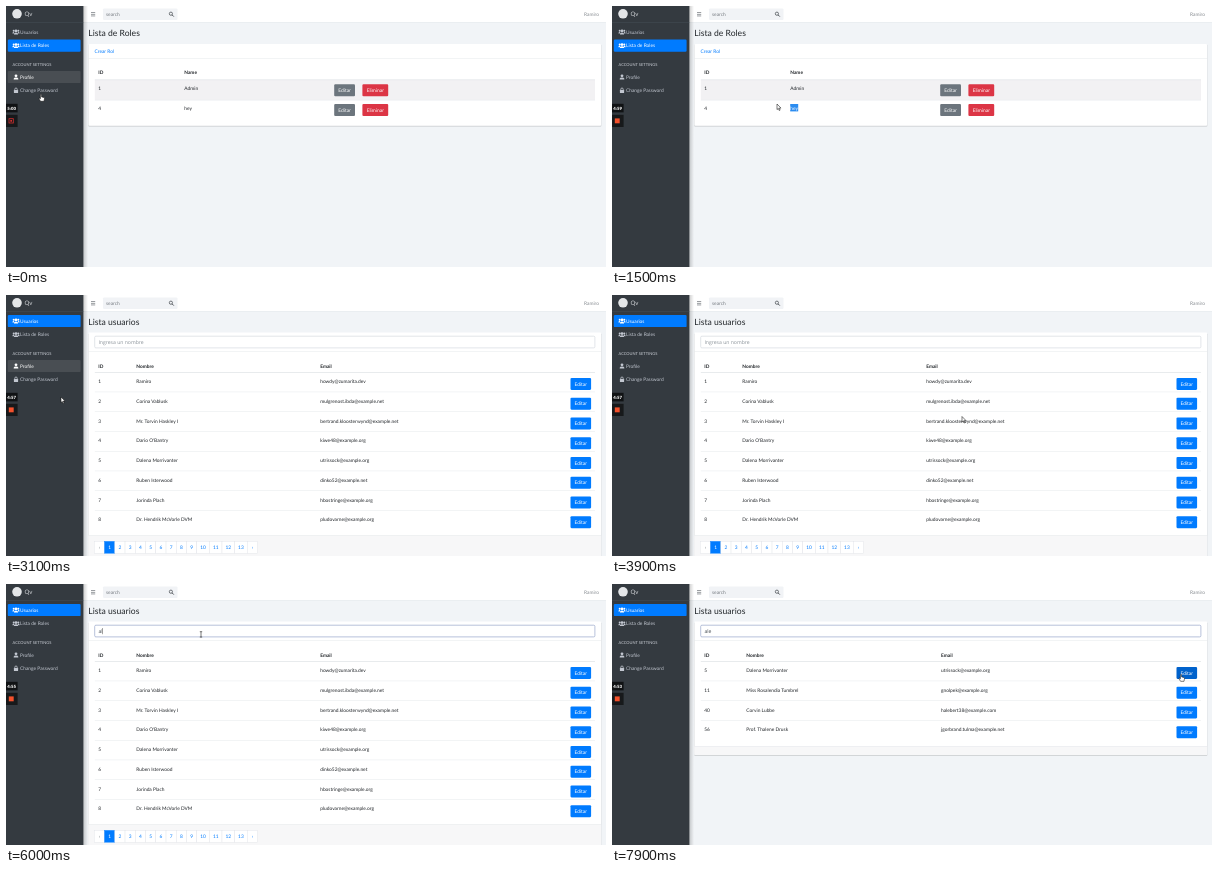
These frames come from a looping animation (600 px wide and 261 px high, 8 s). An HTML page:

```html
<!DOCTYPE html>
<html lang="es">
<head>
<meta charset="utf-8">
<title>Lista de Roles</title>
<style>
html, body { margin: 0; width: 100%; height: 100%; overflow: hidden; background: #f1f4f7; }
svg { display: block; width: 600px; height: 261px; }
text { font-family: Lato, "Open Sans", sans-serif; text-rendering: geometricPrecision; white-space: pre; }
.field { font-family: "Open Sans", "Noto Sans", sans-serif; }
</style>
</head>
<body>
<svg id="stage" viewBox="0 0 600 261">
  <defs>
    <linearGradient id="edge"><stop stop-color="#000" stop-opacity=".2"/><stop offset="1" stop-color="#000" stop-opacity="0"/></linearGradient>
  </defs>
  <g id="page"></g>
  <g id="pointer"></g>
</svg>
<script>
const LOOP = 8000, STEP = 100;
const BLUE = '#007bff', INK = '#212529', LINE = '#dee2e6', PALE = '#c2c7d0';

const USERS = [
  [1, 'Ramiro', 'howdy@zumarita.dev'],
  [2, 'Corina Vablusk', 'mulgrenost.ibda@example.net'],
  [3, 'Mr. Torvin Haskley I', 'bertrand.kloosterwynd@example.net'],
  [4, "Dario O'Bantry", 'kiwe48@example.org'],
  [5, 'Dalena Morrivanter', 'utrissock@example.org'],
  [6, 'Ruben Isterwood', 'dinko52@example.net'],
  [7, 'Jorinda Plach', 'hbostringe@example.org'],
  [8, 'Dr. Hendrik McVorle DVM', 'pludovarne@example.org'],
  [11, 'Miss Rosalendia Tumbrel', 'gnolpek@example.org'],
  [40, 'Corvin Lubbe', 'halebert38@example.com'],
  [56, 'Prof. Thalene Drusk', 'jgorbrand.tulma@example.net']
];

// Pointer tip: time, x, y
const PATH = [
  [-100, 32, 72], [0, 35, 88.5], [300, 140, 100], [700, 365, 104], [900, 368, 103],
  [1200, 184, 101], [1300, 180, 101], [1500, 165, 98], [1800, 110, 70], [2100, 30, 34],
  [2300, 5, 27], [2500, 5, 27], [2600, 5, 40.5], [2800, 8, 28], [2900, 12, 28],
  [3100, 55, 102], [3400, 62, 104], [3800, 280, 118], [4200, 560, 132], [4300, 570, 150],
  [4400, 572, 204], [4800, 194.5, 26.5], [5100, 194.5, 28], [5300, 195, 50], [5600, 195, 50.5],
  [6800, 195, 50.5], [7100, 320, 100], [7500, 565, 136], [7700, 569, 90.5], [8000, 569, 90.5]
];

function pointerAt(t) {
  const i = Math.max(1, PATH.findIndex(p => p[0] >= t));
  const [t0, x0, y0] = PATH[i - 1], [t1, x1, y1] = PATH[i];
  const k = (t - t0) / (t1 - t0);
  return [x0 + (x1 - x0) * k, y0 + (y1 - y0) * k];
}

const rect = (x, y, w, h, fill, more = '') =>
  `<rect x="${x}" y="${y}" width="${w}" height="${h}" fill="${fill}" ${more}/>`;
const text = (x, y, s, fill = INK, size = 4.85, more = '') =>
  `<text x="${x}" y="${y}" font-size="${size}" fill="${fill}" ${more}>${s}</text>`;
const path = (d, fill, more = '') => `<path d="${d}" fill="${fill}" ${more}/>`;
const rule = (x, y, w, h = .4) => rect(x, y, w, h, LINE);
const bold = (x, y, s) => text(x, y, s, INK, 4.8, 'font-weight="700"');
const middle = 'text-anchor="middle"';

const ICONS = {
  users: c => `<g fill="${c}"><circle cx="-2.3" cy="-1.2" r="1"/><circle cx="2.3" cy="-1.2" r="1"/><circle cy="-1" r="1.4"/>
    <path d="M-3.5 1.6V.8Q-3.4 0-2 0L-1.8.6-2.2 1.6ZM3.5 1.6V.8Q3.4 0 2 0L1.8.6 2.2 1.6ZM-2 2.4V1.7Q-1.9.7 0 .7T2 1.7V2.4Z"/></g>`,
  user: c => `<g fill="${c}"><circle cy="-1.2" r="1.4"/><path d="M-2.3 2.6V1.8Q-2.2.4 0 .4T2.3 1.8V2.6Z"/></g>`,
  lock: c => rect(-2.1, -.4, 4.2, 3, c, 'rx=".5"') + path('M-1.2-.3V-1.3A1.2 1.2 0 0 1 1.2-1.3V-.3', 'none', `stroke="${c}" stroke-width=".8"`)
};

const inside = ([x, y], [bx, by, w, h]) => x >= bx && x <= bx + w && y >= by && y <= by + h;

function render(t) {
  const users = t >= 3000;
  const tip = pointerAt(t), last = pointerAt(t - STEP);
  const typed = t >= 6200 ? 'ale' : t >= 5800 ? 'al' : t >= 5400 ? 'a' : '';
  const filtered = t >= 6500;
  let out = '', shape = 'arrow';

  // Registers a clickable box and tells whether it is lit
  const hot = box => {
    if (inside(tip, box)) shape = 'hand';
    return inside(last, box);
  };
  const button = (x, y, w, label, fill, dark) =>
    rect(x, y, w, 12, hot([x, y, w, 12]) ? dark : fill, 'rx="1.1"') +
    text(x + w / 2, y + 7.8, label, '#fff', 4.9, middle);
  const card = (y, h) =>
    rect(82.2, y + .6, 513.2, h + .4, '#000', 'opacity=".13" rx="1"') + rect(82.5, y, 512.6, h, '#fff', 'rx="1"');

  function sidebar() {
    let s = rect(77, 0, 5, 261, 'url(#edge)') + rect(0, 0, 77.4, 261, '#343a40') + rect(0, 16, 77.4, .4, '#4b545c');
    s += '<circle cx="11" cy="7.8" r="4.8" fill="#e4e6e8"/>' + text(18.5, 10.3, 'Qv', '#d3d6d9', 6.1);
    const links = [['users', 'Usuarios', 26, users], ['users', 'Lista de Roles', 39.6, !users],
                   ['user', 'Profile', 71, false], ['lock', 'Change Password', 84.5, false]];
    for (const [icon, label, y, active] of links) {
      const lit = hot([1.8, y - 6.1, 72.8, 12.2]);
      const color = active || lit ? '#fff' : PALE;
      if (active || lit) s += rect(1.8, y - 6.1, 72.8, 12.2, active ? BLUE : '#494e53', 'rx="1.2"');
      s += `<g transform="translate(10 ${y})">${ICONS[icon](color)}</g>` + text(14, y + 1.7, label, color);
    }
    return s + text(6.5, 60.1, 'ACCOUNT SETTINGS', '#d0d4db', 4);
  }

  function topbar() {
    let s = rect(77, 0, 523, 16, '#fff') + rule(77, 16, 523);
    for (const y of [6.2, 7.9, 9.6]) s += rect(85, y, 4.2, .7, '#70757a');
    s += rect(97, 2.4, 74.5, 11.6, '#f1f3f6', 'rx="1.2"') + text(100, 9.9, 'search', '#777c82');
    s += path('M166.1 8.9L167.8 10.6', 'none', 'stroke="#50555a" stroke-width="1"') +
      '<circle cx="164.9" cy="7.7" r="1.6" fill="none" stroke="#50555a" stroke-width=".8"/>';
    return s + text(593, 9.9, 'Ramiro', '#868b90', 4.85, 'text-anchor="end"');
  }

  function roles() {
    let s = text(82.3, 30.4, 'Lista de Roles', INK, 8.6) + card(38, 81.8) + rule(82.5, 52, 512.6);
    s += text(88.5, 46.5, 'Crear Rol', BLUE) + bold(92.3, 68.2, 'ID') + bold(178.3, 68.2, 'Name');
    s += rect(88.8, 74, 500.2, 20, '#f2f1f3') + rule(88.8, 73.5, 500.2, .7) + rule(88.8, 93.9, 500.2);
    [[1, 'Admin'], [4, 'hey']].forEach(([id, name], i) => {
      const y = 78.3 + i * 19.7, picked = i && t >= 1300;
      if (picked) s += rect(178.2, 98, 8, 7.4, '#2b8cf0');
      s += text(92.3, y + 5.6, id) + text(178.3, y + 5.6, name, picked ? '#fff' : INK);
      s += button(328.2, y, 20.8, 'Editar', '#6c757d', '#5a6268') + button(356.4, y, 25.8, 'Eliminar', '#dc3545', '#bd2130');
    });
    return s;
  }

  function pager(y) {
    let s = '', x = 88.3;
    for (const p of ['‹', 1, 2, 3, 4, 5, 6, 7, 8, 9, 10, 11, 12, 13, '›']) {
      const w = p > 9 ? 12.6 : 10.25, on = p === 1;
      s += rect(x, y, w, 11.8, on ? BLUE : '#fff', `stroke="${on ? BLUE : LINE}" stroke-width=".4"`);
      s += text(x + w / 2, y + 7.6, p, on ? '#fff' : p === '‹' ? '#6c757d' : BLUE, 4.85, middle);
      x += w;
    }
    return s;
  }

  function people() {
    const rows = filtered ? USERS.filter(u => /ale/i.test(u.join(' '))) : USERS.slice(0, 8);
    const [nameX, mailX] = filtered ? [134.3, 329] : [130.3, 314.2];
    const end = 77.2 + rows.length * 19.75, foot = end + (filtered ? 7.2 : 6.3);
    const focus = t >= 5300, field = [88.7, 41.2, 500.2, 11.7];
    let s = text(82.3, 30.4, 'Lista usuarios', INK, 8.6) + card(37.6, filtered ? 133.4 : 240);
    s += rule(82.5, 56.6, 512.6);
    s += rect(...field, '#fff', `rx="1.2" stroke="${focus ? '#8798c2' : '#ced4da'}" stroke-width=".6"`);
    s += text(92.4, 48.8, typed || 'Ingresa un nombre', typed ? '#495057' : '#8b939a', 5.1, 'class="field"');
    if (focus && t < 6800 && t % 1000 < 500 | t >= 5800) s += rect(92.5 + [0, 2.8, 4.1, 7][typed.length], 44, .4, 6.2, '#222');
    s += bold(92.3, 72.8, 'ID') + bold(nameX, 72.8, 'Nombre') + bold(mailX, 72.8, 'Email') + rule(88.8, 77, 500.2, .7);
    rows.forEach(([id, name, mail], i) => {
      const y = 82.9 + i * 19.75;
      if (i) s += rule(88.8, y - 5.9, 500.2);
      s += text(92.3, y + 5.2, id) + text(nameX, y + 5.2, name) + text(mailX, y + 5.2, mail);
      s += button(564.5, y, 20.6, 'Editar', BLUE, '#0062cc');
    });
    s += rect(82.5, foot - 6, 512.6, .01, LINE) + rect(82.5, foot - 1.2, 512.6, filtered ? 8.8 : 30, '#f7f7f8') + rule(82.5, foot - 1.2, 512.6);
    if (!filtered) s += pager(246.4);
    if (inside(tip, field)) shape = 'beam';
    return s;
  }

  function recorder() {
    const left = Math.min(300, Math.ceil(300.05 - t / 1000));
    const clock = Math.floor(left / 60) + ':' + String(left % 60).padStart(2, '0');
    const icon = t < STEP
      ? rect(3, 112.7, 4.3, 4.3, 'none', 'stroke="#d32f2f" stroke-width=".8"') + rect(4.3, 114, 1.7, 1.7, '#d32f2f')
      : rect(2.8, 112.4, 4.9, 4.9, '#f4512c');
    return rect(0, 97.8, 11.6, 8.6, '#101214') + rect(0, 108.8, 11.6, 12.2, '#17191b') +
      text(5.6, 103.7, clock, '#fff', 4.3, 'font-weight="900" ' + middle) + icon;
  }

  out += rect(0, 0, 600, 261, '#f1f4f7') + (users ? people() : roles()) + topbar() + sidebar() + recorder();
  document.getElementById('page').innerHTML = out;

  const outline = 'stroke="#111" stroke-width=".55" stroke-linejoin="round"';
  const shapes = {
    arrow: path('M0 0V5.6L1.3 4.4 2.2 6.5 3.1 6.1 2.2 4.1H4Z', '#fff', outline),
    hand: path('M-.6.2Q0-.5.6.2V2.4L3 3Q3.6 3.2 3.5 4L3 6.8H-.4L-2 4.4Q-2.2 3.6-1.4 3.7L-.6 4.3Z', '#fff', outline),
    beam: path('M-1.2-2.8H1.2M0-2.8V2.6M-1.2 2.6H1.2', 'none', 'stroke="#222" stroke-width=".6"')
  };
  const pointer = document.getElementById('pointer');
  pointer.innerHTML = shapes[shape];
  pointer.setAttribute('transform', `translate(${tip})`);
}

let shown = -1;
function tick() {
  const t = Math.floor(performance.now() % LOOP / STEP) * STEP;
  if (t !== shown) render(shown = t);
  requestAnimationFrame(tick);
}
tick();
</script>
</body>
</html>
```
